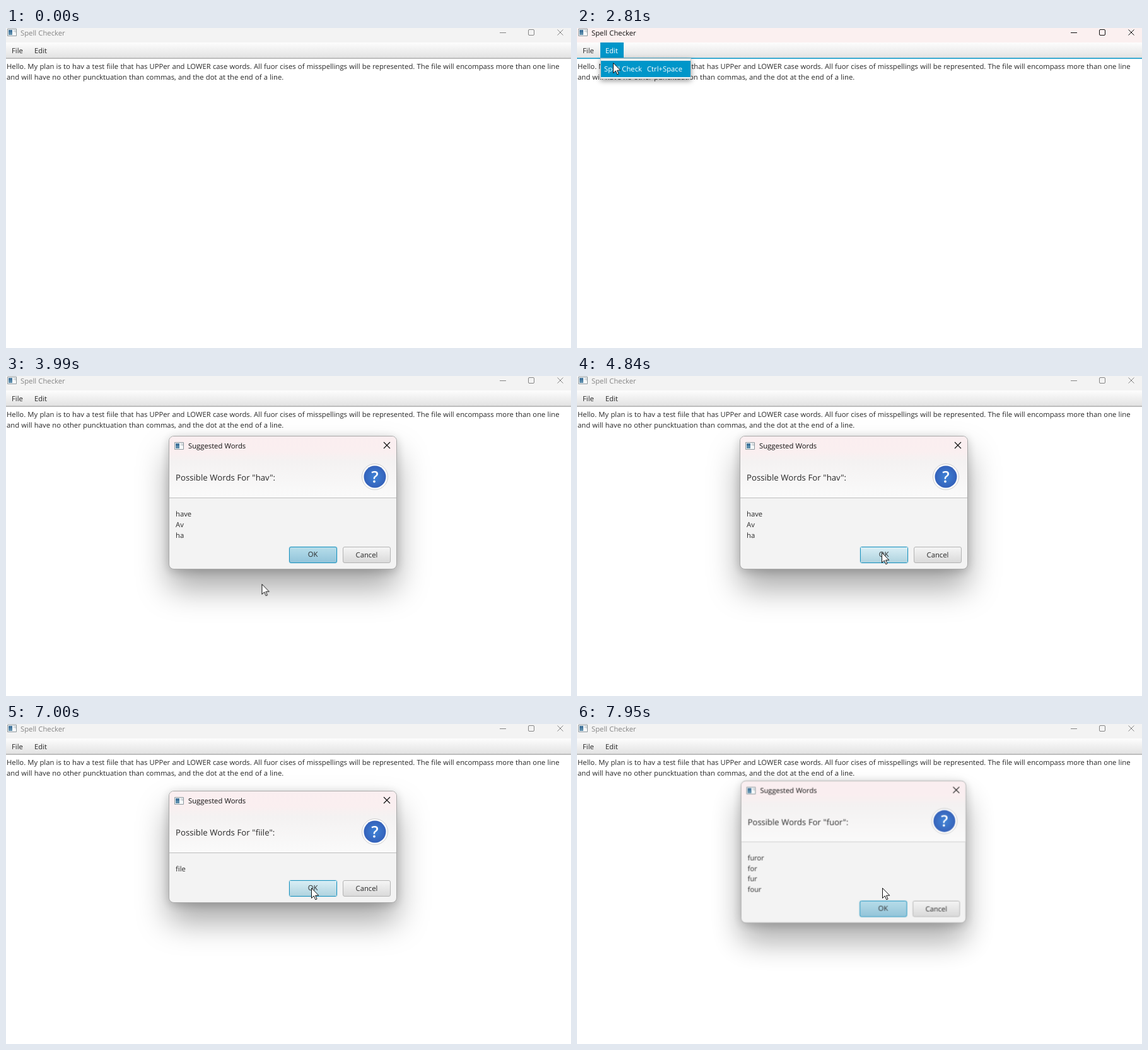
Write an HTML page that moves like this. It is 896 px wide and 508 px high and loops after 8 s.

```html
<!DOCTYPE html>
<html lang="en">
<head>
<meta charset="utf-8">
<title>Spell Checker</title>
<style>
  html, body { margin: 0; width: 896px; height: 508px; overflow: hidden; background: #fff; }
  body { position: relative; font: 11.27px/16px "Open Sans", "Noto Sans", sans-serif; color: #282828;
         word-spacing: .3px; text-rendering: geometricPrecision; }
  div, svg { position: absolute; box-sizing: border-box; }
  svg { overflow: visible; fill: none; }
  .t { white-space: pre; }
  #bar { width: 896px; height: 23px; background: #f3f3f3; color: #858585; }
  #menus { top: 23px; width: 896px; height: 24px; background: linear-gradient(#fdfdfd, #e3e3e3); }
  #rule { top: 47px; width: 896px; height: 2px; background: linear-gradient(#c4c4c4 50%, #b4b4b4 50%); }
  #focus { top: 47px; width: 896px; height: 2px; background: linear-gradient(#5cb8d8 50%, #1b9cc9 50%); }
  #edit { left: 37px; top: 23px; width: 37px; height: 24px; background: #0096c9; color: #fff; }
  #popup { left: 37px; top: 48px; width: 144px; height: 33px; background: #f4f4f4;
           border: 1px solid #c8c8c8; box-shadow: 0 3px 8px rgba(0,0,0,.4); }
  #item { left: 0; top: 3px; width: 142px; height: 26px; }
  .dialog { left: 258px; width: 362px; border: 1px solid #a9a9a9; border-radius: 8px; background: #f3f3f3;
            box-shadow: 0 30px 50px rgba(0,0,0,.34), 0 3px 16px rgba(0,0,0,.2); }
  .head { width: 360px; height: 98px; border-radius: 7px 7px 0 0; border-bottom: 1px solid #bdbdbd;
          background: linear-gradient(#fbeef0 0, #faeff0 24px, #f4f2f2 40px, #fafafa 97px); }
  .big { font-size: 13.2px; }
  .btn { width: 76px; height: 26px; border: 1px solid #b3b3b3; border-radius: 3px; text-align: center;
         line-height: 25px; background: linear-gradient(#f5f5f5, #dadada); }
  .ok { border: 1.5px solid #1a93bf; background: linear-gradient(#b6ddea, #92c4da); line-height: 24px;
        box-shadow: 0 0 1px #1a93bf; }
  .lit { left: 0; top: 0; width: 100%; height: 100%; background: linear-gradient(#d9eef5, #afd3df); }
  .down { left: 0; top: 0; width: 100%; height: 100%; background: linear-gradient(#8dbdd0, #a0cade); }
  .ok .t { width: 100%; }
</style>
</head>
<body>
<script>
const LOOP = 8000;

function add(parent, cls, x, y, html = '') {
  const el = document.createElement('div');
  el.className = cls;
  if (x !== undefined) el.style.left = x + 'px';
  if (y !== undefined) el.style.top = y + 'px';
  el.innerHTML = html;
  return parent.appendChild(el);
}
function part(parent, id) {
  const el = add(parent, '');
  el.id = id;
  return el;
}
// y is the baseline
const text = (parent, x, y, str, cls = '') => add(parent, 't ' + cls, x, y - 11, str);
const svg = (parent, x, y, body) => add(parent, '', x, y, `<svg width="1" height="1">${body}</svg>`);

// rows: [ms, properties, easing towards the next row]
function play(el, rows) {
  const all = [[0, rows[0][1]], ...rows, [LOOP, rows[rows.length - 1][1]]];
  el.animate(all.map(([t, props, easing = 'linear']) => ({ ...props, offset: t / LOOP, easing })),
    { duration: LOOP, iterations: Infinity });
}
// shown from each first time to each second time, with hard changes
function show(el, ...spans) {
  const rows = [[0, { opacity: 0 }, 'step-end']];
  for (const [from, to] of spans)
    rows.push([from, { opacity: 1 }, 'step-end'], [to, { opacity: 0 }, 'step-end']);
  play(el, rows);
}

const appIcon = (parent, x, y) => svg(parent, x, y, `
  <path d="M.5 .5h14v11h-14z" fill="#f8fafb" stroke="#8d979d"/>
  <path d="M2 2h6v8H2z" fill="#41749b"/><path d="M2 6h6v4H2z" fill="#5c8cab"/>
  <path d="M10 2.5h1.5M10 4.5h1.5M13 2v4" stroke="#a9b3b8"/>`);

// main window
text(document.body, 1, 65, 'Hello. My plan is to hav a test fiile that has UPPer and LOWER case words. All fuor cises of misspellings will be represented. The file will encompass more than one line');
text(document.body, 1, 82, 'and will have no other puncktuation than commas, and the dot at the end of a line.');

const bar = part(document.body, 'bar');
appIcon(bar, 1.5, 1);
text(bar, 23, 12, 'Spell Checker');
svg(bar, 0, 0, `<path d="M783 7.5h10M874.5 2.5l9 9m0-9l-9 9" stroke="currentColor"/>
  <rect x="828.5" y="2.5" width="9" height="9" rx="1.5" stroke="currentColor"/>`);

const menus = part(document.body, 'menus');
text(menus, 9, 17, 'File');
text(menus, 45, 17, 'Edit');
part(document.body, 'rule');
const focus = part(document.body, 'focus');
const edit = part(document.body, 'edit');
text(edit, 8, 17, 'Edit');

const popup = part(document.body, 'popup');
const item = part(popup, 'item');
text(item, 5, 17, 'Spell Check');
text(item, 73, 17, 'Ctrl+Space');

const idle = { backgroundColor: '#f3f3f3', color: '#858585' };
const active = { backgroundColor: '#fbf0f0', color: '#111' };
const blink = { backgroundColor: '#f3f3f3', color: '#4a4a4a' };
play(bar, [
  [2000, idle], [2230, active], [3330, active], [3530, idle],
  [6090, idle], [6130, blink], [6170, idle],
  [7770, idle], [7820, blink], [7870, idle]
]);
show(edit, [1770, 3260]);
show(focus, [2000, 3330]);
play(popup, [[2000, { opacity: 0 }], [2090, { opacity: 1 }], [3260, { opacity: 1 }], [3340, { opacity: 0 }]]);
play(item, [
  [0, { backgroundColor: '#0096c900', color: '#282828' }, 'step-end'],
  [2720, { backgroundColor: '#0096c9', color: '#fff' }]
]);

// suggestion dialogs
function dialog(word, words, poses, hover, press) {
  const n = words.length, h = 161 + 17 * n, top = Math.round(112 - 17 * n / 3);
  const box = add(document.body, 'dialog', 258, top);
  box.style.height = h + 'px';
  box.style.transformOrigin = `132px ${160 - top}px`;
  add(box, 'head', 0, 0);
  appIcon(box, 8, 8.5);
  text(box, 30, 19, 'Suggested Words').style.color = '#111';
  svg(box, 345, 14, '<path d="M-5-5L5 5M5-5L-5 5" stroke="#111" stroke-width="1.2"/>');
  text(box, 10, 68, `Possible Words For "${word}":`, 'big');
  svg(box, 326, 64, `
    <defs><radialGradient id="g-${word}"><stop stop-color="#3f83d6"/><stop offset="1" stop-color="#3461ba"/></radialGradient></defs>
    <circle r="20.5" fill="#fdfdfd" stroke="#cfcfcf"/><circle r="17.5" fill="url(#g-${word})"/>
    <text y="8.5" text-anchor="middle" font-size="25" font-weight="600" fill="#fff">?</text>`);
  words.forEach((w, i) => text(box, 10, 127 + 17 * i, w));
  const ok = add(box, 'btn ok', 189.5, h - 37);
  show(add(ok, 'lit'), hover);
  show(add(ok, 'down'), press);
  add(ok, 't', 0, 0, 'OK');
  add(box, 'btn', 275, h - 37, 'Cancel');
  play(box, poses.map(([t, opacity, s, easing]) => [t, { opacity, transform: `scale(${s})` }, easing]));
}

dialog('hav', ['have', 'Av', 'ha'], [
  [3330, 0, .9, 'ease-out'], [3560, 1, 1], [6120, 1, 1],
  [6180, .4, .953], [6235, .4, .953], [6240, 0, .93]
], [4740, 8000], [5960, 6100]);
dialog('fiile', ['file'], [
  [6240, 0, .9, 'ease-out'], [6430, 1, 1], [7775, 1, 1], [7880, 0, .93]
], [6900, 8000], [7630, 7770]);
dialog('fuor', ['furor', 'for', 'fur', 'four'], [
  [7850, 0, .92, 'ease-out'], [7950, .98, .9875]
], [8000, 8000], [8000, 8000]);

// pointer
const pointer = add(document.body, '', 0, 0);
const beam = svg(pointer, 0, 0, '<path d="M-3.5-7.5h2.5l1.5 1 1.5-1h2.5M-3.5 7.5h2.5l1.5-1 1.5 1h2.5M.5-6.5v13" stroke="#111"/>');
const arrow = svg(pointer, 0, 0, '<path d="M.5.5v16l3.8-3.6 2.5 5.9 2.3-1-2.5-5.6h5.2z" fill="#fff" stroke="#111"/>');
show(beam, [430, 1740]);
show(arrow, [1740, 8000]);
play(pointer, [
  [430, 836, 512, 'cubic-bezier(.3,.3,.5,1)'], [1200, 488, 123],
  [1250, 488, 123, 'cubic-bezier(.4,.2,.7,.9)'], [1530, 138, 70, 'ease-out'], [1820, 58, 39],
  [2480, 58, 39], [2810, 57, 55], [2970, 60, 62],
  [3480, 60, 62, 'cubic-bezier(.4,.1,.7,.9)'], [3990, 405, 330], [4040, 425, 332],
  [4200, 470, 341, 'ease-out'], [4360, 522, 328],
  [4520, 522, 328, 'ease-in-out'], [4840, 483, 280],
  [6810, 483, 280, 'ease-out'], [7000, 484, 260]
].map(([t, x, y, easing]) => [t, { transform: `translate(${x}px, ${y}px)` }, easing]));
</script>
</body>
</html>
```
